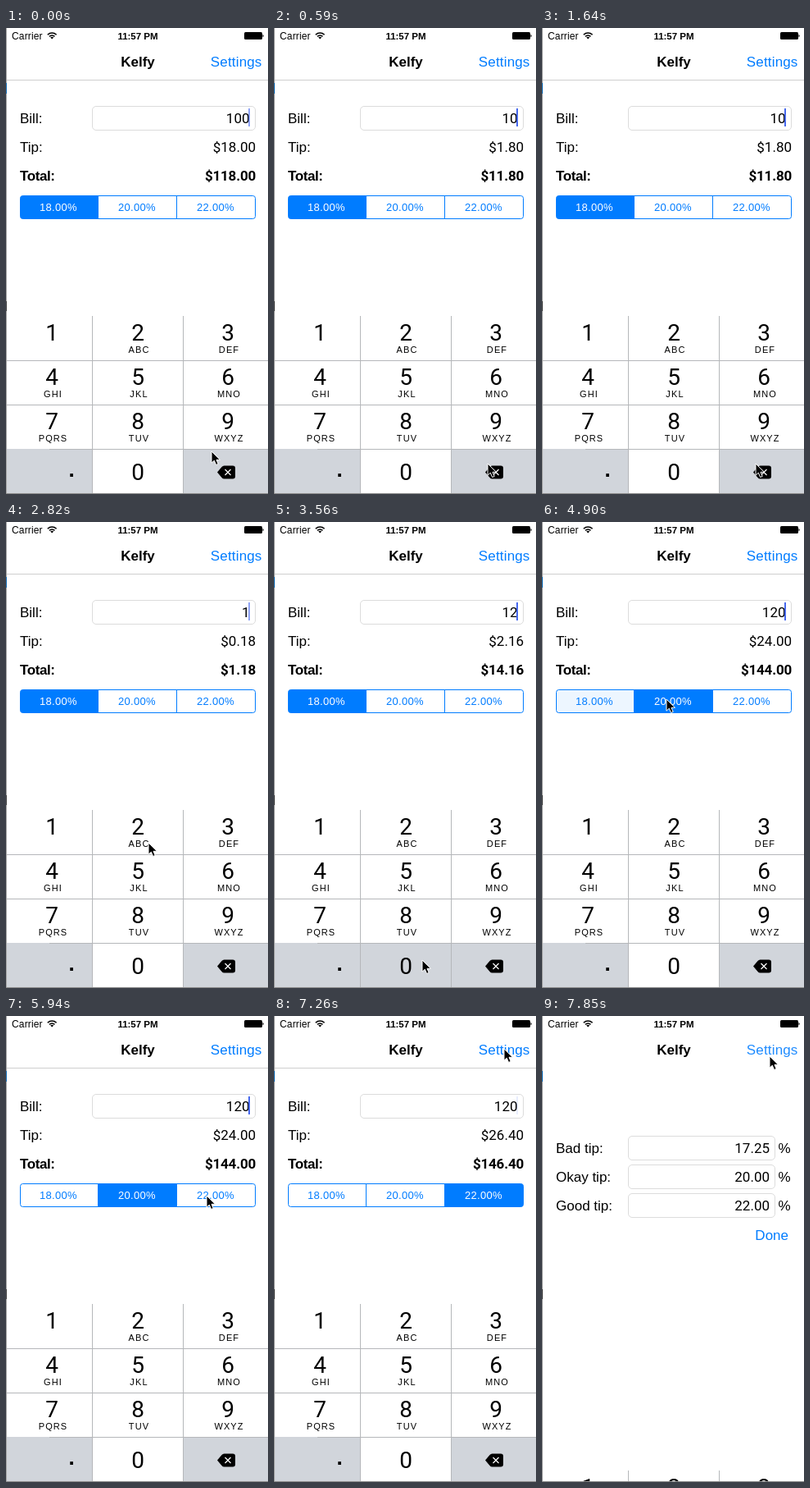
Recreate the animation shown at these times as an HTML page. Size 320 px wide and 568 px high, loop 8 s.

```html
<!DOCTYPE html>
<html lang="en">
<head>
<meta charset="utf-8">
<title>Tip calculator</title>
<style>
  html, body { margin: 0; width: 100%; height: 100%; overflow: hidden; background: #fff; }
  svg { display: block; width: 320px; height: 568px; font: 17px "Liberation Sans", Arial, sans-serif; }
  .field { fill: #fff; stroke: #dcdcdc; }
  .blue { fill: #007cff; }
  .bold { font-weight: bold; }
  .num { font-family: Roboto, "Liberation Sans", sans-serif; }
  .sep { stroke: #b5b7ba; }
</style>
</head>
<body>
<svg id="stage" viewBox="0 0 320 568"></svg>
<script>
const LOOP = 8000, TICK = LOOP / 54;
const BLUE = '#007cff', GREY = '#d1d5db';
const stage = document.getElementById('stage');

function add(parent, tag, attrs = {}, text) {
  const el = document.createElementNS('http://www.w3.org/2000/svg', tag);
  for (const k in attrs) el.setAttribute(k, attrs[k]);
  if (text !== undefined) el.textContent = text;
  parent.appendChild(el);
  return el;
}
const group = () => add(stage, 'g');
const rect = (p, x, y, width, height, attrs) => add(p, 'rect', { x, y, width, height, ...attrs });
const path = (p, d, attrs) => add(p, 'path', { d, ...attrs });
const label = (p, x, y, text, attrs) => add(p, 'text', { x, y, ...attrs }, text);
const END = { 'text-anchor': 'end' }, MID = { 'text-anchor': 'middle' };
const AMOUNT = { ...END, class: 'num' };

// Main screen
const main = group();
rect(main, 0, 0, 320, 568, { fill: '#fff' });
path(main, 'M0 63.5H320', { stroke: '#cfcfcf' });
label(main, 161, 47, 'Kelfy', { ...MID, class: 'bold' });
const settings = label(main, 312.5, 47, 'Settings', { ...END, class: 'blue', 'letter-spacing': .15 });

label(main, 17, 115.5, 'Bill:');
label(main, 17, 150.5, 'Tip:');
label(main, 17, 185.5, 'Total:', { class: 'bold', 'letter-spacing': -.4 });
rect(main, 105.5, 95.5, 199, 29, { rx: 4.5, class: 'field' });
const bill = label(main, 297.5, 115.5, '', AMOUNT);
const caret = rect(main, 296, 98, 2, 22, { fill: '#4668ee' });
const tip = label(main, 305, 150.5, '', AMOUNT);
const total = label(main, 305, 185.5, '', { ...END, class: 'bold num', 'letter-spacing': -.2 });

// Segmented control
const rates = [18, 20, 22];
const shapes = ['M112.5 204.5H20.5a3 3 0 0 0-3 3V229.5a3 3 0 0 0 3 3H112.5Z',
  'M112.5 204.5H208.5V232.5H112.5Z',
  'M208.5 204.5H301.5a3 3 0 0 1 3 3V229.5a3 3 0 0 1-3 3H208.5Z'];
const segments = rates.map((r, i) => ({
  box: path(main, shapes[i], { fill: BLUE, stroke: BLUE }),
  text: label(main, 64 + 96 * i, 223, r.toFixed(2) + '%', { ...MID, 'font-size': 13, 'letter-spacing': .3 })
}));

// Status bar
const status = group();
label(status, 7, 14, 'Carrier', { 'font-size': 12, 'letter-spacing': .15 });
label(status, 161, 14, '11:57 PM', { ...MID, class: 'bold', 'font-size': 11.5 });
path(status, 'M50.8 8.2a7.6 7.6 0 0 1 10.8 0M53 10.4a4.6 4.6 0 0 1 6.4 0', { fill: 'none', stroke: '#000', 'stroke-width': 1.6 });
path(status, 'M56.2 13.6l-2-2a2.9 2.9 0 0 1 4 0Z');
rect(status, 291, 5, 22, 9, { rx: 1.5 });
path(status, 'M313.5 7.7q2.5 1.8 0 3.6Z');

// Settings sheet
const sheet = group();
rect(sheet, 0, 0, 320, 568, { fill: '#fff' });
[['Bad', '17.25'], ['Okay', '20.00'], ['Good', '22.00']].forEach(([name, value], i) => {
  const y = 35 * i;
  label(sheet, 17, 115.5 + y, name + ' tip:');
  rect(sheet, 105.5, 95.5 + y, 179, 29, { rx: 4.5, class: 'field' });
  label(sheet, 278, 115.5 + y, value, AMOUNT);
  label(sheet, 288.5, 115.5 + y, '%');
});
label(sheet, 301, 222, 'Done', { ...END, class: 'blue' });

// Keyboard
const keyboard = group();
const letters = ['', 'ABC', 'DEF', 'GHI', 'JKL', 'MNO', 'PQRS', 'TUV', 'WXYZ'];
const DIGIT = { ...MID, class: 'num', 'font-size': 28 };
const colX = [0, 106, 216], colW = [106, 110, 104], mid = [56, 161, 271];
const keys = {};
function key(name, col, row, fill) {
  keys[name] = { fill, box: rect(keyboard, colX[col], 351 + 54 * row, colW[col], 54, { fill }) };
}
letters.forEach((text, i) => {
  const col = i % 3, row = Math.floor(i / 3), y = 54 * row;
  key(i + 1, col, row, '#fff');
  label(keyboard, mid[col], 381 + y, i + 1, DIGIT);
  label(keyboard, mid[col] + 1.5, 396 + y, text, { ...MID, 'font-size': 11, 'letter-spacing': 1.1 });
});
key('dot', 0, 3, GREY);
key(0, 1, 3, '#fff');
key('del', 2, 3, GREY);
label(keyboard, 80, 547, '.', { ...MID, class: 'bold', 'font-size': 26 });
label(keyboard, 161, 550.5, 0, DIGIT);
path(keyboard, 'M258 541.5l5.5-6.5q1.2-1.5 3-1.5H277q3 0 3 3V546.5q0 3-3 3H266.5q-1.8 0-3-1.5Z');
path(keyboard, 'M267.5 538l7 7m0-7l-7 7', { stroke: '#fff', 'stroke-width': 1.2 });
path(keyboard, 'M0 405.5H320M0 459.5H320M53 513.5H320M105.5 351V568M216.5 351V568', { class: 'sep' });

// Window edge
const edge = group();
rect(edge, 0, 0, 1, 568, { fill: '#a6a6a6' });
rect(edge, 0, 67, 1, 13, { fill: '#1670b8' });
rect(edge, 0, 333, 1, 12, { fill: '#444' });
rect(edge, 0, 567, 320, 1, { fill: '#8c8c8c' });

const pointer = path(stage, 'M0 0V14.2L3.3 11.2L5.6 16.5L8.2 15.4L6 10.3H10.5Z', { stroke: '#fff' });

// Steps: [tick, value]
const bills = [[0, 100], [3, 10], [15, 1], [21, 12], [25, 120]];
const chosen = [[0, 0], [33, 1], [42, 2]];
const tinted = [[0, -1], [32, 1], [33, 0], [34, -1], [41, 2], [42, 1], [43, -1]];
const pressed = [[0, ''], [2, 'del'], [4, ''], [14, 'del'], [16, ''], [20, '2'], [22, ''], [24, '0'], [26, '']];
const linkAlpha = [[0, 1], [50, .2], [52, .6], [53, .88]];
const blinkStart = [[0, -4], [3, 3], [15, 15], [21, 21], [25, 25], [30, 30]];
const blink = [1, 1, 1, .6, .12, 0, 0];
// Pointer path: [tick, x, y]
const route = [[0, 251, 516], [2, 261, 531], [15, 261, 531], [17, 222, 448], [19, 174, 391],
  [20, 171, 386], [21, 171, 386], [22, 173, 410], [24, 181, 534], [26, 181, 534], [27, 176, 450],
  [29, 153, 230], [31, 152, 216], [37, 152, 216], [38, 165, 218], [40, 245, 219], [44, 245, 219],
  [45, 248, 190], [47, 270, 75], [49, 281, 40], [51, 281, 40], [53, 278, 49]];

const at = (steps, n) => steps.filter(s => s[0] <= n).pop()[1];

function place(n) {
  const i = route.findIndex(p => p[0] >= n), b = route[i], a = route[Math.max(0, i - 1)];
  const f = b[0] > a[0] ? (n - a[0]) / (b[0] - a[0]) : 0;
  return [1, 2].map(k => a[k] + (b[k] - a[k]) * f);
}

// Critically damped slide, 0 to 1
function slide(n, start, speed) {
  const s = Math.max(0, n - start) * speed;
  return 1 - (1 + s) * Math.exp(-s);
}

const move = (el, x, y) => el.setAttribute('transform', `translate(${Math.round(x)} ${Math.round(y)})`);

function draw(n) {
  const amount = at(bills, n), pick = at(chosen, n), tint = at(tinted, n), down = at(pressed, n);
  const tipValue = amount * rates[pick] / 100;
  bill.textContent = amount;
  tip.textContent = '$' + tipValue.toFixed(2);
  total.textContent = '$' + (amount + tipValue).toFixed(2);

  const age = n - at(blinkStart, n);
  caret.setAttribute('opacity', age < 1 ? 1 : blink[(age - 1) % 7]);

  segments.forEach(({ box, text }, i) => {
    box.setAttribute('fill-opacity', i === pick ? 1 : i === tint ? .07 : 0);
    text.setAttribute('fill', i === pick ? '#fff' : BLUE);
  });
  for (const k in keys) {
    const { box, fill } = keys[k];
    box.setAttribute('fill', k !== down ? fill : fill === GREY ? '#fff' : GREY);
  }
  settings.setAttribute('opacity', at(linkAlpha, n));

  move(sheet, 0, 568 * (1 - slide(n, 51.3, 2.37)));
  move(keyboard, 0, 217 * slide(n, 51.3, 2.6));
  move(pointer, ...place(n));
}

let last = -1;
function frame() {
  const n = Math.min(53, Math.floor(performance.now() % LOOP / TICK + .05));
  if (n !== last) draw(last = n);
  requestAnimationFrame(frame);
}
frame();
</script>
</body>
</html>
```
